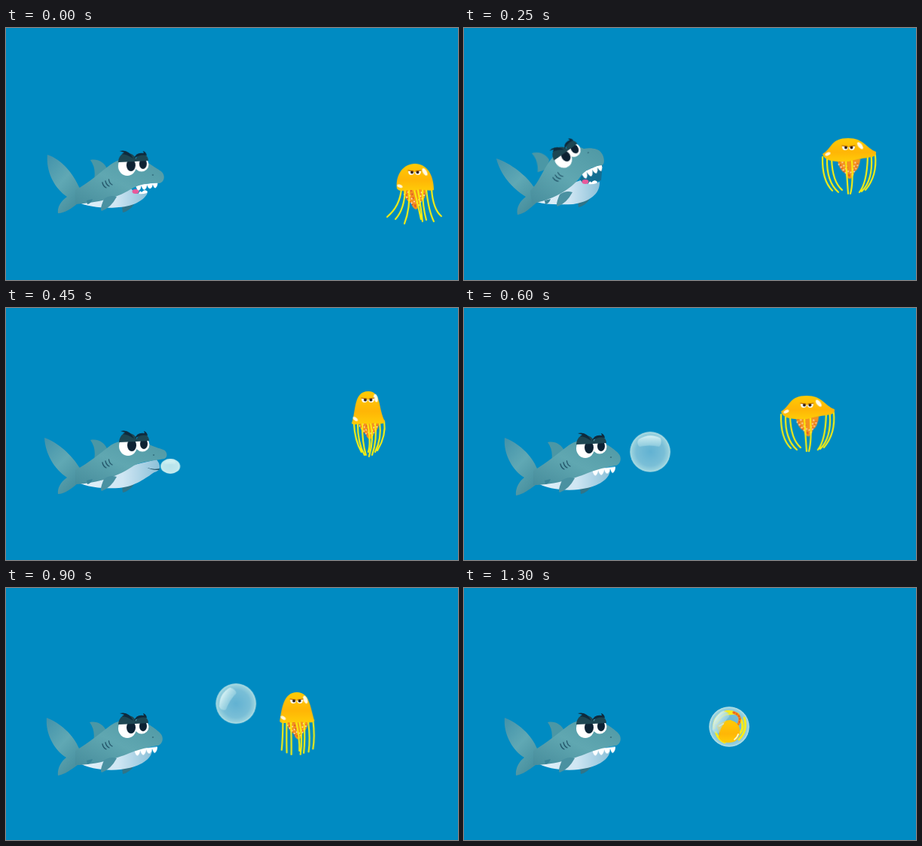
Animation, 600 px wide and 336 px high, one loop 1.35 s. Source, as an HTML page without scripts:

```html
<!DOCTYPE html>
<html lang="en">
<head>
<meta charset="utf-8">
<title>Shark, bubble and jellyfish</title>
<style>
html, body { margin: 0; width: 100%; height: 100%; overflow: hidden; background: #008bc2; }
svg { display: block; width: 100vw; height: 100vh; }
svg * { animation: 1.35s linear infinite; }

/* Shark: snarl, breathe in, blow, rest */
.tail { animation-name: tail; }
.torso { animation-name: torso; }
.belly { animation-name: belly; }
.mouth { animation-name: mouth; }
.teeth { animation-name: teeth; }
.tongue { animation-name: tongue; }
.face { animation-name: face; transform-origin: 174px 182px; }
.gills { animation-name: gills; transform-origin: 135px 207px; }
.dorsal { animation-name: dorsal; transform-origin: 111px 179px; }
.near-fin { animation-name: near-fin; }
.far-fin { animation-name: far-fin; }

@keyframes tail {
  0% { d: path("M55,169C74,175 89,194 97,212C104,219 104,231 95,234C88,240 78,247 69,247C68,240 72,231 81,225C63,213 53,190 55,169Z"); }
  18.52% { d: path("M43,174C62,180 84,198 92,211C102,218 102,230 95,234C88,240 80,248 71,249C69,240 74,231 82,225C64,214 48,195 43,174Z"); }
  22.22% { d: path("M39,176C59,181 82,198 91,211C101,218 102,230 95,234C88,240 80,248 71,249C69,240 74,231 82,225C63,215 45,196 39,176Z"); }
  33.33% { d: path("M51,173C69,179 88,197 97,212C104,219 104,231 95,234C88,240 78,248 69,248C68,241 72,232 81,226C64,215 52,194 51,173Z"); }
  44.44%, 100% { d: path("M54,173C72,180 90,196 97,214C104,220 104,232 95,236C88,241 78,249 69,250C68,242 72,232 80,226C64,216 52,194 54,173Z"); }
}
@keyframes torso {
  0% { d: path("M92,216C111,206 124,193 139,182C150,174 172,168 188,179C196,185 205,190 207,192C212,197 210,206 204,207C190,206 180,208 169,213C150,226 122,233 92,235Z"); }
  18.52%, 22.22% { d: path("M88,217C100,206 105,187 118,172C128,160 148,154 159,161C168,159 179,161 182,166C187,172 187,182 183,183C174,184 164,187 156,196C147,211 122,229 90,234Z"); }
  33.33% { d: path("M92,216C111,206 124,194 139,183C150,176 175,172 188,181C198,186 208,188 211,190C215,194 214,200 210,201C196,204 182,204 170,210C150,224 122,234 92,235Z"); }
  44.44%, 100% { d: path("M92,217C111,206 124,194 139,183C150,175 172,170 188,181C196,186 203,191 205,194C210,199 208,208 202,210C188,212 178,215 167,219C150,226 122,236 92,236Z"); }
}
@keyframes belly {
  0% { d: path("M95,232C108,239 135,241 150,239C170,238 186,228 188,219C180,222 172,222 168,213L100,226Z"); }
  18.52%, 22.22% { d: path("M92,230C100,235 125,236 145,235C165,232 181,222 180,205C172,208 163,210 155,203L100,222Z"); }
  33.33% { d: path("M95,232C108,240 135,241 150,240C172,238 186,226 197,219C206,217 206,209 200,202L100,226Z"); }
  44.44%, 100% { d: path("M95,232C110,242 135,244 152,242C176,239 192,230 194,217C190,212 180,211 168,213L100,226Z"); }
}
@keyframes mouth {
  0% { d: path("M166,214Q185,204 204,206L197,213Q188,220 172,221Z"); }
  18.52%, 22.22% { d: path("M154,202Q160,186 184,182L182,203Q170,208 157,206Z"); }
  33.33% { d: path("M186,212Q194,216 204,214L203,216Q194,217 186,212Z"); fill: #24566a; }
  44.44%, 100% { d: path("M167,216Q185,210 202,208L201,209Q185,212 168,216Z"); }
}
@keyframes teeth {
  0% { transform: translate(172px, 211px) rotate(0deg) scale(.95, .8); }
  18.52%, 22.22% { transform: translate(156px, 195px) rotate(-16deg) scale(.95, 1); }
  33.33% { transform: translate(175px, 206px) rotate(0deg) scale(.9, 0); }
  44.44%, 100% { transform: translate(170px, 217px) rotate(0deg) scale(1, .9); }
}
@keyframes tongue {
  0% { transform: translate(172px, 218px); opacity: 1; }
  18.52%, 22.22% { transform: translate(161px, 205px); opacity: 1; }
  31%, 100% { transform: translate(173px, 216px); opacity: 0; }
}
@keyframes face {
  0% { transform: translate(0, 0) rotate(0deg) scale(1); }
  18.52%, 22.22% { transform: translate(-33px, -16px) rotate(-33deg) scale(.95); }
  33.33% { transform: translate(1px, 0) rotate(0deg) scale(1); }
  44.44%, 100% { transform: translate(0, 3px) rotate(0deg) scale(1); }
}
@keyframes gills {
  0%, 33.33% { transform: translate(0, 0) rotate(0deg); }
  18.52%, 22.22% { transform: translate(-10px, -9px) rotate(-20deg); }
  44.44%, 100% { transform: translate(0, 2px) rotate(0deg); }
}
@keyframes dorsal {
  0%, 33.33% { transform: translate(1px, -3px) rotate(0deg); }
  18.52%, 22.22% { transform: translate(-21px, -12px) rotate(-6deg); }
  44.44%, 100% { transform: translate(0, 0) rotate(0deg); }
}
@keyframes near-fin {
  0%, 33.33% { transform: translate(0, -2px); }
  18.52%, 22.22% { transform: translate(-3px, -8px); }
  44.44%, 100% { transform: none; }
}
@keyframes far-fin {
  0%, 33.33% { transform: translate(0, -2px); }
  18.52%, 22.22% { transform: translate(-3px, -9px); }
  44.44%, 100% { transform: none; }
}

/* Jellyfish: relaxed, spread, squeezed */
.swim { animation-name: swim; }
.jelly { animation-name: until-caught; animation-timing-function: step-end; }
.dome { animation-name: dome; }
.strands { animation-name: strands; }
.arms { animation-name: arms; }
.shine-top { animation-name: shine-top; }
.shine-rim { animation-name: shine-rim; }

@keyframes swim {
  0% { transform: translate(543px, 200px); }
  18.52% { transform: translate(511px, 167px); }
  33.33% { transform: translate(481px, 130px); }
  44.44% { transform: translate(456px, 137px); }
  51.85% { transform: translate(431px, 131px); }
  59.26% { transform: translate(406px, 139px); }
  77.78% { transform: translate(357px, 186px); }
  85%, 100% { transform: translate(354px, 186px); }
}
@keyframes until-caught { 0% { visibility: visible; } 85%, 100% { visibility: hidden; } }
@keyframes dome {
  0%, 77.78%, 100% { d: path("M-24,14C-26,-5 -15,-19 0,-19C15,-19 25,-5 25,16C18,19 8,13 0,17C-8,14 -20,21 -24,14Z"); }
  18.52%, 44.44% { d: path("M-35,1C-22,-7 -24,-20 -1,-20C20,-20 23,-7 36,-2C38,8 24,4 0,11C-18,12 -33,11 -35,1Z"); }
  33.33%, 59.26% { d: path("M-22,24C-16,8 -20,-19 0,-19C18,-19 13,6 22,21C21,28 8,21 0,25C-8,22 -18,28 -22,24Z"); }
}
@keyframes strands {
  0%, 77.78%, 100% { d: path("M-18,15Q-20,38 -37,52M-13,16Q-14,42 -26,55M-8,16Q-6,40 -14,61M-1,16Q4,35 8,55M4,16Q8,40 10,58M10,16Q10,38 15,56M15,16Q18,44 25,58M22,16Q24,42 35,51"); }
  18.52%, 44.44% { d: path("M-35,5Q-36,36 -22,50M-29,7Q-30,38 -14,52M-23,8Q-22,38 -9,49M-4,10Q-2,40 -1,54M4,10Q6,40 2,54M25,6Q24,40 14,52M30,5Q32,36 17,51M35,2Q38,30 22,49"); }
  33.33%, 59.26% { d: path("M-19,23Q-18,46 -9,62M-14,23Q-14,50 -5,66M-8,23Q-8,50 -3,66M-1,23Q4,50 0,62M3,23Q8,44 1,68M9,23Q12,46 5,66M15,23Q18,44 9,62M21,21Q24,40 12,60"); }
}
@keyframes arms {
  0%, 77.78%, 100% { transform: translate(0, 0) scale(1); }
  18.52%, 44.44% { transform: translate(0, -6px) scale(.96); }
  33.33%, 59.26% { transform: translate(1px, 8px) scale(.88); }
}
@keyframes shine-top {
  0%, 77.78%, 100% { transform: translate(13px, -8px) rotate(-30deg); }
  18.52%, 44.44% { transform: translate(15px, -10px) rotate(-38deg); }
  33.33%, 59.26% { transform: translate(10px, -10px) rotate(-14deg); }
}
@keyframes shine-rim {
  0%, 77.78%, 100% { transform: translate(-20px, 11px) rotate(20deg); }
  18.52%, 44.44% { transform: translate(-28px, 1px) rotate(-25deg); }
  33.33%, 59.26% { transform: translate(-17px, 18px) rotate(40deg); }
}

/* Bubble */
.bubble { animation-name: float; }
.gloss { animation-name: roll; }
.fresh { animation-name: clear; }
.caught { animation-name: caught; animation-timing-function: step-end; }
.spin { animation-name: spin; }

@keyframes float {
  0%, 29% { transform: translate(204px, 213px) scale(0, 0); }
  33.33% { transform: translate(218px, 211px) scale(.47, .36); }
  37.04% { transform: translate(228px, 206px) scale(.72, .66); }
  40.74% { transform: translate(238px, 199px) scale(.94, .92); }
  44.44% { transform: translate(247px, 192px) scale(1, 1); }
  51.85% { transform: translate(262px, 171px) scale(1, 1); }
  59.26% { transform: translate(279px, 155px) scale(1, 1); }
  66.67% { transform: translate(305px, 154px) scale(1, 1); }
  77.78% { transform: translate(348px, 175px) scale(1, 1); }
  81.48% { transform: translate(350px, 181px) scale(1, 1); }
  85.19% { transform: translate(351px, 184px) scale(1, 1); }
  96.3%, 100% { transform: translate(352px, 185px) scale(1, 1); }
}
@keyframes roll {
  0%, 44.44% { transform: rotate(0deg); }
  59.26%, 100% { transform: rotate(-58deg); }
}
@keyframes clear { 0%, 33.33% { opacity: .75; } 42%, 100% { opacity: 0; } }
@keyframes caught { 0% { visibility: hidden; } 85%, 100% { visibility: visible; } }
@keyframes spin { 0%, 85% { transform: rotate(-100deg); } 96.3%, 100% { transform: none; } }
</style>
</head>
<body>
<svg viewBox="0 0 600 336" preserveAspectRatio="none">
  <defs>
    <linearGradient id="skin" x1="0" y1="1" x2=".9" y2="0">
      <stop offset="0" stop-color="#478d9c"/><stop offset=".5" stop-color="#60a7b1"/><stop offset="1" stop-color="#5099a5"/>
    </linearGradient>
    <linearGradient id="tail-skin" x1="0" y1="0" x2=".7" y2="1">
      <stop offset="0" stop-color="#4292aa"/><stop offset=".5" stop-color="#60a8b4"/><stop offset="1" stop-color="#458d9c"/>
    </linearGradient>
    <linearGradient id="pale">
      <stop offset="0" stop-color="#e4f2fa"/><stop offset=".55" stop-color="#cfe6f3"/><stop offset="1" stop-color="#8bc0d8"/>
    </linearGradient>
    <linearGradient id="gold" x1="0" y1="0" x2="0" y2="1">
      <stop offset="0" stop-color="#ffcb05"/><stop offset=".6" stop-color="#ffb606"/><stop offset="1" stop-color="#ffcc08"/>
    </linearGradient>
    <radialGradient id="film">
      <stop offset="0" stop-color="#62b2d2"/><stop offset=".7" stop-color="#7abfd7"/><stop offset="1" stop-color="#a3d8e1"/>
    </radialGradient>
    <linearGradient id="glare" x1="0" y1="0" x2="0" y2="1">
      <stop offset="0" stop-color="#d6f1f4"/><stop offset="1" stop-color="#a2d6e3" stop-opacity=".6"/>
    </linearGradient>
  </defs>

  <g id="shark">
    <path class="far-fin" fill="#2f7488" d="M154,240L170,237Q164,246 155,248Z"/>
    <path class="dorsal" fill="#4b97a5" d="M111,179C121,177 129,182 133,190L130,202L116,205Q119,190 111,179Z"/>
    <path class="tail" fill="url(#tail-skin)"/>
    <path class="belly" fill="url(#pale)"/>
    <path class="mouth" fill="#008bc2"/>
    <g class="tongue">
      <ellipse rx="4.5" ry="3" fill="#e85a9b"/>
      <path fill="#fff" d="M4,3Q6,-3 8,1Q12,-4 16,0L15,2Q9,4 4,3Z"/>
    </g>
    <path class="teeth" fill="#fff" d="M0,-2Q2,8 5,7Q8,4 8,-1Q10,7 13,6Q16,3 16,-2Q18,5 21,4Q24,1 24,-3Q26,4 28,3Q31,0 31,-6Z"/>
    <path class="torso" fill="url(#skin)"/>
    <path fill="#3b8497" d="M107,230L115,228Q113,234 108,235Z"/>
    <path class="near-fin" fill="#4a91a1" d="M130,230Q138,224 147,227Q139,242 127,246Q124,244 130,230Z"/>
    <path class="gills" fill="none" stroke="#24566a" stroke-width="1.3" stroke-linecap="round" d="M128,206Q129,211 133,213M132,204Q133,209 137,211M136.500,202Q137,207 141,209"/>
    <g class="face">
      <ellipse cx="195" cy="196" rx="1.200" ry=".8" fill="#285f70"/>
      <ellipse cx="180" cy="182" rx="9.500" ry="9.500" fill="#fff"/>
      <ellipse cx="161" cy="184" rx="12" ry="13" fill="#fff"/>
      <g fill="#0d2233">
        <ellipse cx="166" cy="183" rx="6" ry="8"/>
        <ellipse cx="182" cy="181" rx="5" ry="7"/>
      </g>
      <path fill="#1d4652" d="M149,179C150,169 156,165 163,167C169,168 173,172 173,178ZM172,178C172,172 178,167 182,168C187,169 189,173 189,177Z"/>
      <path fill="#0f2a3c" d="M151,164Q163,161 169,174Q160,168 154,168L157,166ZM170,174Q173,165 183,167L182,164Q186,165 187,170Q178,168 170,174Z"/>
    </g>
  </g>

  <g class="bubble">
    <circle r="26.700" fill="url(#film)"/>
    <circle r="25.800" fill="none" stroke="#b5e0e5" stroke-opacity=".6" stroke-width="1.500"/>
    <g class="caught">
      <g class="spin">
        <path fill="none" stroke="#f9ec1c" stroke-width="3" stroke-linecap="round" d="M-20,2A20,20 0 0 1 4,-20M-17,-5Q-6,-21 12,-17M20,-12Q25,5 13,17M16,-9Q21,3 12,11M-18,7Q-14,18 -6,21"/>
        <path fill="none" stroke="#f28a1c" stroke-width="3.500" stroke-linecap="round" d="M6,-19Q17,-15 13,-5Q10,1 4,-2"/>
        <path fill="none" stroke="#e23d2d" stroke-width="1.200" stroke-dasharray="1 3" stroke-linecap="round" d="M6,-19Q17,-15 13,-5Q10,1 4,-2"/>
        <path fill="url(#gold)" d="M-17,-1Q-8,-9 2,-9Q15,-5 14,7Q13,20 2,21Q-10,23 -14,14Q-12,7 -17,-1Z"/>
        <path fill="#72bad3" d="M-12,-9Q-4,-19 4,-12L7,-7Q-2,-13 -12,-9Z"/>
        <path fill="none" stroke="#fff3c0" stroke-width="2" stroke-linecap="round" d="M-13,-1L-8,-4M7,17Q11,14 12,10"/>
      </g>
    </g>
    <path class="gloss" fill="url(#glare)" d="M-15,-17Q0,-26 14,-18Q16,-10 12,-7Q-1,-10 -14,-7Q-19,-11 -15,-17Z"/>
    <circle class="fresh" r="26.700" fill="#d5f5f4"/>
  </g>

  <g class="swim">
    <g class="jelly">
      <g class="arms">
        <path fill="#f4921e" d="M-16,14L16,14Q14,29 8,32Q5,42 1,42Q-3,41 -5,34Q-14,30 -16,14Z"/>
        <g fill="none" stroke-width="2" stroke-linecap="round">
          <path stroke="#d9432f" stroke-dasharray="0 5" d="M-13,18Q-11,30 0,38Q10,30 13,18M-5,17L1,40"/>
          <path stroke="#fff0d8" stroke-dasharray="0 5" d="M-9,19Q-6,28 2,34Q7,28 9,18M-14,22L-4,34M12,23L3,40"/>
        </g>
      </g>
      <path class="strands" fill="none" stroke="#fbf00f" stroke-width="2.1" stroke-linecap="round"/>
      <path class="dome" fill="url(#gold)"/>
      <ellipse class="shine-top" rx="2.600" ry="5.500" fill="#fff" fill-opacity=".9"/>
      <ellipse class="shine-rim" rx="3.800" ry="2" fill="#fff" fill-opacity=".85"/>
      <path fill="#fff" d="M-9,-9.500L-1,-8Q-1,-4 -5,-4Q-9,-4 -9,-9.500ZM0,-8L8,-9.500Q8,-4 4,-4Q0,-4 0,-8Z"/>
      <circle cx="-4" cy="-7.500" r="2" fill="#2a1a12"/>
      <circle cx="3.500" cy="-7.500" r="2" fill="#2a1a12"/>
      <path fill="none" stroke="#a85a08" stroke-linecap="round" d="M-9,-10L-2,-9M1,-9L8,-10"/>
    </g>
  </g>
</svg>
</body>
</html>
```
